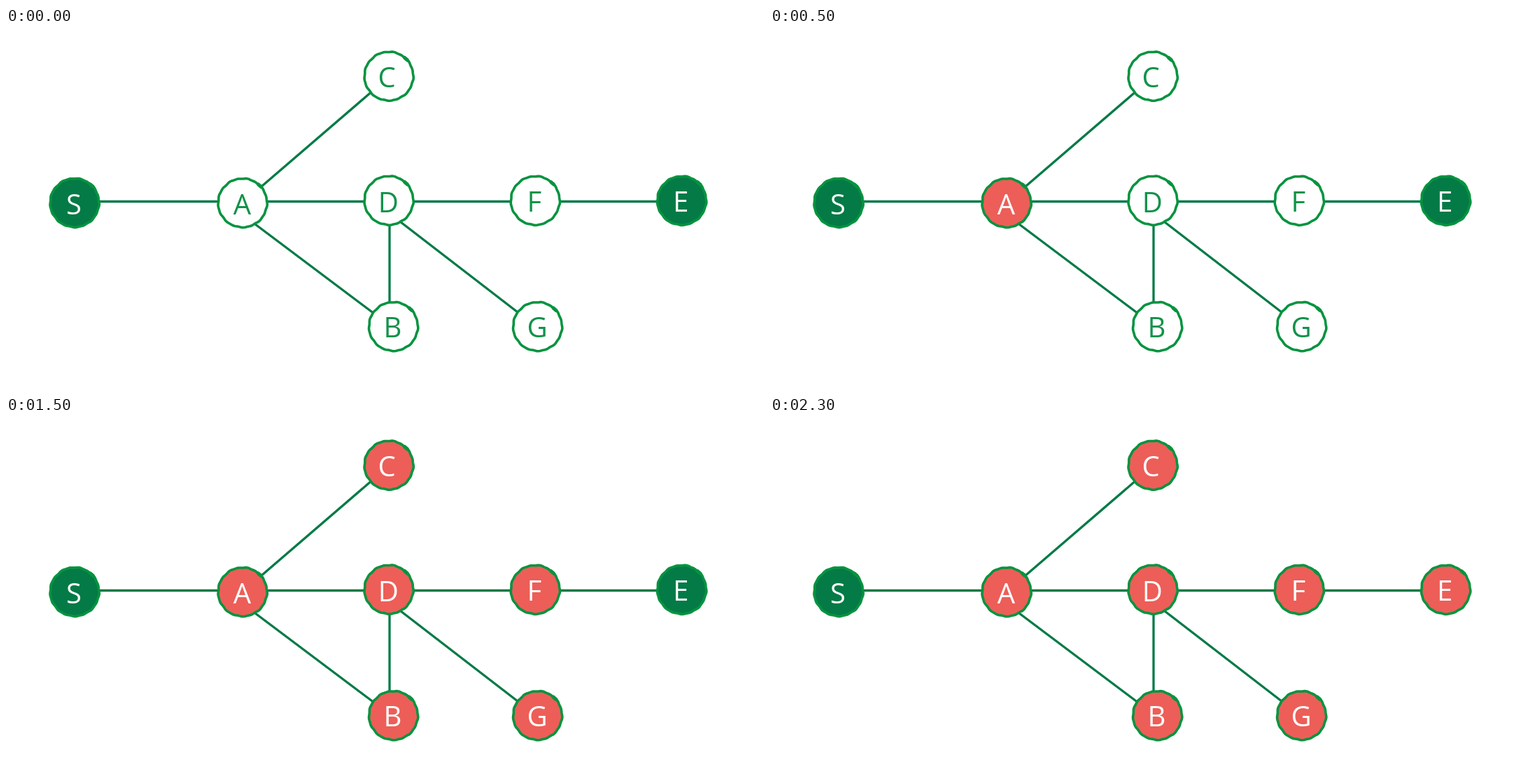
Write an HTML page that moves like this. It is 1083 px wide and 517 px high and loops after 2500 ms.

```html
<!DOCTYPE html>
<html lang="en">
<head>
<meta charset="utf-8">
<title>Breadth-first search</title>
<style>
  html, body { margin: 0; width: 100%; height: 100%; overflow: hidden; background: #fff; }
  svg { display: block; }
  .edge { stroke: #047a46; stroke-width: 3.3; }
  .rim { stroke: #06933f; stroke-width: 3.6; stroke-linejoin: round; }
  .knot { stroke: #06933f; stroke-width: 5; stroke-linecap: round; }
  text { font: 40px "Open Sans", "Noto Sans", sans-serif; text-anchor: middle; }
</style>
</head>
<body>
<svg id="stage" width="1083" height="517" viewBox="0 0 1083 517"></svg>
<script>
const STEP = 500, STEPS = 5;
const GREEN = '#047a46', RED = '#ed5e58', WHITE = '#fff', LETTER = '#12924a';

// Label, centre, text anchor and baseline, step of the visit, colour before it
const nodes = [
  ['S', 98, 250.3, 97, 266.5, Infinity, GREEN],
  ['A', 338, 250.5, 337.5, 266.5, 1, WHITE],
  ['C', 547, 69, 544, 85, 2, WHITE],
  ['D', 547, 247, 546.3, 264, 2, WHITE],
  ['B', 553.5, 427.5, 552.5, 443, 2, WHITE],
  ['F', 756.2, 247.2, 754.8, 263, 3, WHITE],
  ['G', 759.5, 427.5, 759, 443, 3, WHITE],
  ['E', 965.5, 247.2, 964, 263, 4, GREEN]
];
const edges = [
  [133, 248.5, 303, 248.5], [372, 248.5, 512, 248.5],
  [582, 248.5, 721, 248.5], [791, 248.5, 930, 248.5],
  [365, 227, 521, 92.5], [356, 281, 524, 407.5],
  [548, 282, 548, 392], [564, 278, 731, 407]
];

const stage = document.getElementById('stage');

function add(tag, attributes, parent = stage) {
  const element = document.createElementNS('http://www.w3.org/2000/svg', tag);
  for (const name in attributes) element.setAttribute(name, attributes[name]);
  return parent.appendChild(element);
}

const line = (className, [x1, y1, x2, y2], parent) =>
  add('line', { class: className, x1, y1, x2, y2 }, parent);

// A circle with the slight wobble of a hand-drawn pen stroke
const rimPoints = Array.from({ length: 90 }, (_, i) => {
  const a = i * Math.PI / 45;
  const r = 34.9 + 0.25 * Math.sin(9 * a + 1) + 0.3 * Math.sin(17 * a);
  return `${(r * Math.cos(a)).toFixed(2)},${(r * Math.sin(a)).toFixed(2)}`;
}).join(' ');

edges.forEach(edge => line('edge', edge));

const views = nodes.map(([label, x, y, textX, baseline, visit, color]) => {
  const group = add('g', { transform: `translate(${x} ${y})` });
  const disc = add('polygon', { class: 'rim', points: rimPoints }, group);
  line('knot', [22.5, -26.5, 26.5, -23], group);
  const text = add('text', { x: textX, y: baseline });
  text.textContent = label;
  return { disc, text, visit, color };
});

function draw() {
  const step = Math.floor(performance.now() / STEP) % STEPS;
  for (const { disc, text, visit, color } of views) {
    const fill = step >= visit ? RED : color;
    disc.setAttribute('fill', fill);
    text.setAttribute('fill', fill === WHITE ? LETTER : WHITE);
  }
  requestAnimationFrame(draw);
}
draw();
</script>
</body>
</html>
```
